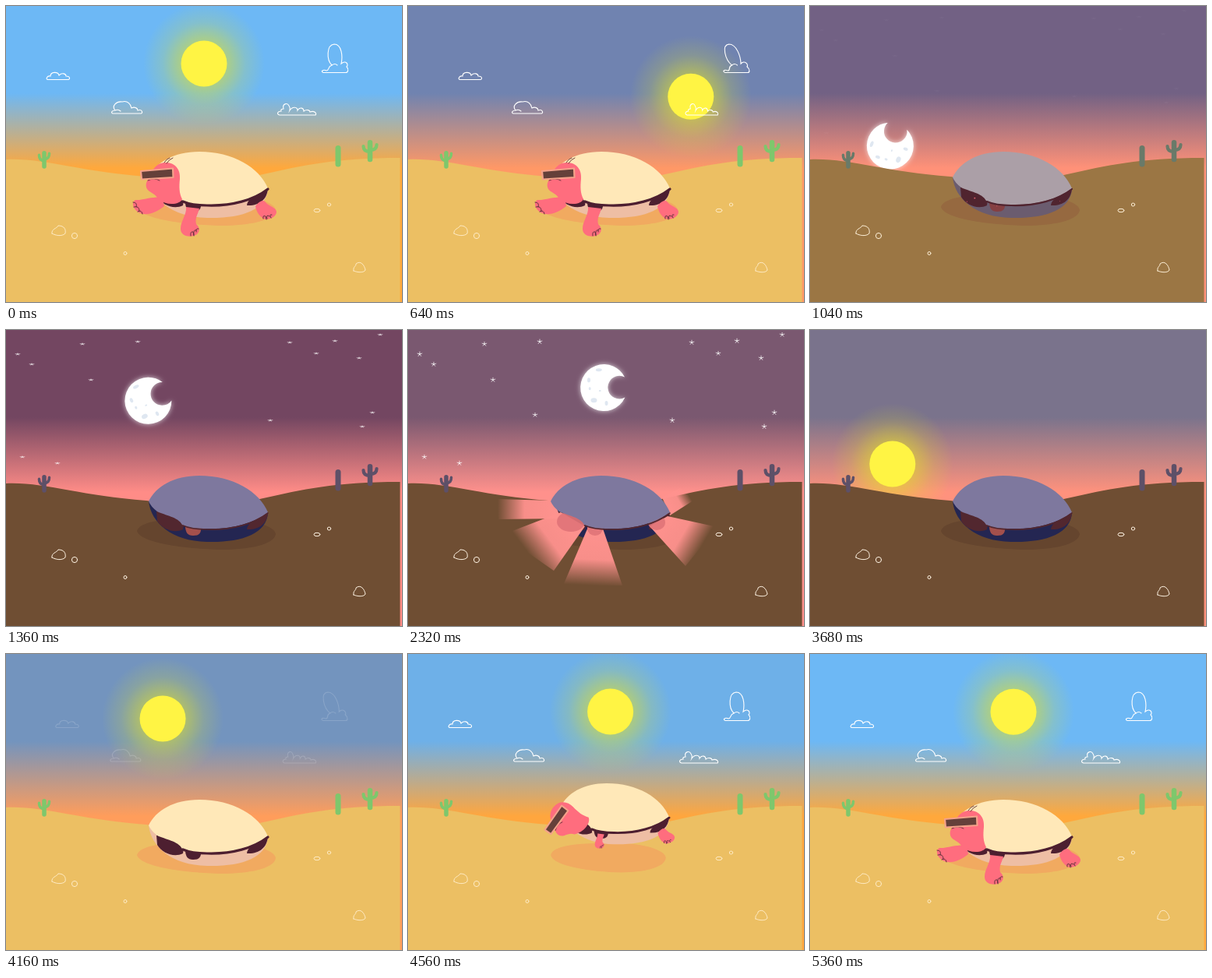
These frames come from a looping animation (508 px wide and 380 px high, 6000 ms). An HTML page with a canvas:

```html
<!DOCTYPE html>
<html lang="en">
<head>
<meta charset="utf-8">
<title>Desert turtle</title>
<style>
html, body { margin: 0; width: 100%; height: 100%; overflow: hidden; }
canvas { display: block; width: 508px; height: 380px; }
</style>
</head>
<body>
<canvas id="stage" width="508" height="380"></canvas>
<script>
const ctx = document.getElementById('stage').getContext('2d');
const LOOP = 6000, STEP = 80;

const lerp = (a, b, p) => a + (b - a) * p;
const clamp = v => Math.max(0, Math.min(1, v));
const ramp = (t, a, b) => { const p = clamp((t - a) / (b - a)); return p * p * (3 - 2 * p); };
const rgb = (c, a = 1) => `rgba(${c.map(Math.round).join()},${a})`;
const mix = (a, b, p) => a.map((v, i) => lerp(v, b[i], p));

// Smooth monotone interpolation through [time, value] keys
function spline(keys, t) {
  const i = Math.max(0, keys.findLastIndex(k => k[0] <= t));
  if (i >= keys.length - 1) return keys[keys.length - 1][1];
  const slope = n => (keys[n + 1][1] - keys[n][1]) / (keys[n + 1][0] - keys[n][0]);
  const tangent = n => {
    if (n === 0 || n === keys.length - 1) return 0;
    const a = slope(n - 1), b = slope(n);
    return 2 * a * b / (a + b);
  };
  const [t0, v0] = keys[i], [t1, v1] = keys[i + 1];
  const h = t1 - t0, p = (t - t0) / h, q = 1 - p;
  return v0 * (1 + 2 * p) * q * q + v1 * p * p * (3 - 2 * p)
    + h * p * q * (tangent(i) * q - tangent(i + 1) * p);
}

const ORBIT = [[0, 0], [640, 42.5], [1360, 153.6], [2320, 179], [2640, 182], [3680, 293], [4560, 362], [4880, 362.5]];
const SKY = [
  [0, [109, 184, 245], [255, 168, 60]],
  [640, [112, 131, 176], [255, 152, 102]],
  [1360, [115, 70, 97], [255, 140, 135]],
  [2320, [122, 88, 112], [255, 145, 140]],
  [3680, [122, 115, 140], [255, 146, 125]],
  [4560, [110, 176, 232], [255, 166, 62]],
  [4960, [109, 184, 245], [255, 168, 60]]
];

const paths = {
  ground: 'M0 197C50 195 95 213 180 219C235 227 285 227 330 216C380 205 420 195 505.5 195V380H0Z',
  shadow: 'M168 258C172 244 214 241 258 242C306 240 345 250 346 262C344 276 310 282 277 282C228 281 172 273 168 258Z',
  belly: 'M183 220C186 247 212 271 258 272C302 273 334 262 336 235Z',
  dome: 'M183 220C192 201 215 187 248 187C291 187 325 207 336 234C318 248 290 256 258 255C243 255 231 254 226 250C221 240 204 238 194 233Q186 227 183 220Z',
  rim: 'M336 235C318 249 290 257 258 256Q238 256 227 251',
  neckHole: 'M193 233C205 232 216 236 222 241Q229 247 227 256C215 262 200 255 194 245Z',
  legHole: 'M230 251H250C251 261 248 264 240 264C233 264 230 260 230 251Z',
  rearHole: 'M336 234C335 249 324 257 309 256C309 249 318 244 336 234Z',
  head: 'M205 201C218 201 224 211 223 222C222 232 222 240 226 248C222 256 205 256 195 248C193 243 189 241 184 238C177 233 179 224 186 219C187 208 195 201 205 201Z',
  glasses: 'M173 212L214 208.500L214.500 220L174 222.500Z',
  mouth: 'M182 224Q190 220 197 224',
  frontLeg: 'M201 247C188 243 176 250 166 249C160 252 163 262 172 266C182 270 194 264 203 257Z',
  frontClaws: 'M163 252Q169 252 167 258M164 258Q171 256 171 263M169 264Q174 261 175 267',
  midLeg: 'M231 258C232 268 224 276 224 286C224 295 234 297 241 295C250 292 249 284 244 280C242 272 246 268 248 260Z',
  midClaws: 'M237 295Q236 289 240 290L241 295M241 294Q240 286 244 288M244 290Q243 285 247 286',
  rearLeg: 'M320 257C325 250 331 248 333 252C338 258 346 258 347 264C347 270 340 274 333 274C326 272 321 264 320 257Z',
  rearClaws: 'M330 273Q329 268 333 270L334 274M335 273Q333 267 338 270M340 272Q337 267 341 268',
  rocks: 'M59 292C58 286 65 286 67 282C75 282 77 287 76 292C72 296 64 295 59 292ZM446 340C445 334 449 335 449 331C455 326 460 333 461 339C459 343 450 342 446 340Z'
};
for (const name in paths) paths[name] = new Path2D(paths[name]);

// Path, pivot, drift and lean for each cloud
const clouds = [
  ['M54 94.500C50 94 53 89 57 90C57 84 67 84 68 89C72 85 77 87 77 90C83 90 82 94.500 80 94.500Z', 82, 95, 13, 0, 0],
  ['M137 138C134 137 136 134 140 134C135 128 142 122 149 123C156 121 160 126 161 131C165 129 169 131 169 134C175 132 176 138 173 138ZM140 134Q144 132 147 135', 155, 138, -2, 0, 0],
  ['M351 140C347 139 348 135 353 135C352 133 354 132 356 132C354 125 361 124 363 128Q365 131 364 134C368 128 374 130 374 134C377 129 382 131 382 135C386 132 390 134 390 136C396 134 399 138 397 140Z', 398, 140, 0, 0, .15],
  ['M407 85.500C403 84 407 81 411 83C415 83 412 78 418 76C411 69 411 50 421 49C431 49 432 65 430 74C436 69 440 75 437 78C440 81 439 86 435 85.500ZM418 76Q422 73 425 76', 422, 86, 0, .25, 0]
].map(([d, ...rest]) => [new Path2D(d), ...rest]);

const stars = [[15, 31], [33, 44], [98, 18], [169, 15], [109, 64], [163, 109], [339, 116], [364, 16],
  [398, 30], [422, 14], [453, 36], [480, 6], [470, 106], [457, 124], [21, 163], [66, 171]];

// Each beam: two points at the shell, then two at its far end
const beams = [
  [187, 219, 196, 242, 116, 243, 114, 217],
  [196, 234, 227, 252, 187, 309, 121, 263],
  [231, 253, 250, 255, 275, 328, 199, 328],
  [333, 239, 310, 252, 356, 303, 397, 253],
  [326, 215, 336, 238, 369, 217, 349, 203]
];

function fill(path, color) { ctx.fillStyle = color; ctx.fill(path); }
function line(path, color, width = 1) {
  ctx.strokeStyle = color;
  ctx.lineWidth = width;
  ctx.stroke(path);
}
function disc(x, y, rx, ry = rx) {
  ctx.beginPath();
  ctx.ellipse(x, y, rx, ry, 0, 0, Math.PI * 2);
}
function grouped(draw) { ctx.save(); draw(); ctx.restore(); }
function about(x, y, sx, sy = sx, angle = 0) {
  ctx.translate(x, y);
  ctx.rotate(angle);
  ctx.scale(sx, sy);
  ctx.translate(-x, -y);
}
function glow(x, y, inner, outer, color, alpha) {
  const g = ctx.createRadialGradient(x, y, inner, x, y, outer);
  g.addColorStop(0, rgb(color, alpha));
  g.addColorStop(.5, rgb(color, alpha * .35));
  g.addColorStop(1, rgb(color, 0));
  ctx.fillStyle = g;
  disc(x, y, outer);
  ctx.fill();
}

function drawSky(t) {
  const i = SKY.findLastIndex(k => k[0] <= t);
  const a = SKY[i], b = SKY[Math.min(i + 1, SKY.length - 1)];
  const p = a === b ? 0 : (t - a[0]) / (b[0] - a[0]);
  const g = ctx.createLinearGradient(0, 112, 0, 208);
  g.addColorStop(0, rgb(mix(a[1], b[1], p)));
  g.addColorStop(1, rgb(mix(a[2], b[2], p)));
  ctx.fillStyle = g;
  ctx.fillRect(0, 0, 508, 380);
}

function drawStars(t) {
  ctx.strokeStyle = '#fff';
  ctx.lineWidth = .9;
  ctx.globalAlpha = .85 * ramp(t, 1000, 1300) * (1 - ramp(t, 3200, 3600));
  stars.forEach(([x, y], i) => grouped(() => {
    const open = ramp(t, 1300, 1800 + i * 25);
    ctx.translate(x, y);
    ctx.scale(1, lerp(.4, 1, open) * (1 - .12 * Math.sin((t - 2320) / 160 + i) ** 2));
    ctx.beginPath();
    for (let k = 0; k < 5; k++) {
      const a = -Math.PI / 2 + k * Math.PI * .4;
      ctx.moveTo(0, 0);
      ctx.lineTo(3 * Math.cos(a), 3 * Math.sin(a));
    }
    ctx.stroke();
  }));
  ctx.globalAlpha = 1;
}

function drawSunAndMoon(t) {
  const angle = spline(ORBIT, t) * Math.PI / 180;
  const x = 254 + 161 * Math.sin(angle), y = 235 - 161 * Math.cos(angle);
  if (y < 275) {
    glow(x, y, 28, 78, [225, 225, 40], .55);
    ctx.fillStyle = '#fff444';
    disc(x, y, 29.5);
    ctx.fill();
  }
  if (y > 195) grouped(() => {
    ctx.translate(254, 235);
    ctx.rotate(angle - Math.PI);
    ctx.translate(0, -161);
    const crescent = new Path2D();
    const horn = Math.atan2(13, 27), bite = Math.atan2(13, 7);
    crescent.arc(0, 0, 30, horn, Math.PI * 2 - horn);
    crescent.arc(20, 0, 14.8, -bite, bite, true);
    crescent.closePath();
    ctx.shadowColor = 'rgba(255,255,255,.75)';
    ctx.shadowBlur = 6;
    fill(crescent, '#fff');
    ctx.shadowBlur = 0;
    ctx.fillStyle = '#dfe7f1';
    for (const [cx, cy, rx, ry] of [[-6, -23, 4, 2], [-18, 1, 1.5, 2], [-5, 4, 1.5, 1], [-13, 16, 4, 3], [3, 20, 2, 3], [-19, -10, 2, 3]]) {
      disc(cx, cy, rx, ry);
      ctx.fill();
    }
  });
}

function drawClouds(t) {
  const away = t < 2400 ? ramp(t, 0, 640) : 1 - ramp(t, 4080, 4480);
  ctx.globalAlpha = t < 2400 ? 1 - ramp(t, 680, 1040) : ramp(t, 4080, 4400);
  for (const [path, x, y, drift, lean, shrink] of clouds) grouped(() => {
    ctx.translate(x + drift * away, y);
    ctx.transform(1 - shrink * away, 0, lean * away, 1, 0, 0);
    ctx.translate(-x, -y);
    line(path, '#fff', 1.1);
  });
  ctx.globalAlpha = 1;
}

function drawCactus(x, top, bottom, width, arm) {
  ctx.lineWidth = width;
  ctx.beginPath();
  ctx.moveTo(x, top + width / 2);
  ctx.lineTo(x, bottom);
  ctx.stroke();
  if (!arm) return;
  const elbow = top + (bottom - top) * .52;
  ctx.lineWidth = width * .65;
  for (const side of [-1, 1]) {
    const y = elbow - (side > 0 ? 2 : 0);
    ctx.beginPath();
    ctx.moveTo(x, y + 2);
    ctx.quadraticCurveTo(x + side * arm, y + 2, x + side * arm, y - 5);
    ctx.stroke();
  }
}

function drawLand(day) {
  const tone = (night, light) => rgb(mix(night, light, day));
  fill(paths.ground, tone([111, 78, 51], [236, 191, 99]));
  ctx.strokeStyle = tone([93, 80, 104], [126, 199, 108]);
  ctx.lineCap = 'round';
  drawCactus(49, 186, 206, 5.5, 6.5);
  drawCactus(426, 179, 203, 7, 0);
  drawCactus(467, 172, 197, 6.5, 8.5);
  const pale = tone([255, 244, 228], [255, 235, 196]);
  line(paths.rocks, pale);
  for (const [x, y, rx, ry] of [[88, 295, 3.6, 3.6], [153, 317.500, 2, 2], [399, 262.500, 4, 2.2], [414.500, 255, 2.2, 2]]) {
    disc(x, y, rx, ry);
    ctx.stroke();
  }
}

function drawBeams(t, power) {
  if (!power) return;
  const stretch = power * (1 + .12 * Math.sin((t - 2320) / 190));
  for (const [ax, ay, bx, by, cx, cy, dx, dy] of beams) {
    const mx = (ax + bx) / 2, my = (ay + by) / 2;
    const ex = lerp(mx, (cx + dx) / 2, stretch), ey = lerp(my, (cy + dy) / 2, stretch);
    const g = ctx.createLinearGradient(mx, my, ex, ey);
    g.addColorStop(0, rgb([255, 146, 142], power));
    g.addColorStop(.55, rgb([255, 146, 142], power * .95));
    g.addColorStop(1, rgb([255, 146, 142], 0));
    ctx.fillStyle = g;
    ctx.beginPath();
    ctx.moveTo(ax, ay);
    ctx.lineTo(bx, by);
    ctx.lineTo(lerp(bx, cx, stretch), lerp(by, cy, stretch));
    ctx.lineTo(lerp(ax, dx, stretch), lerp(ay, dy, stretch));
    ctx.fill();
  }
  ctx.fillStyle = rgb([224, 116, 120], power * .9);
  for (const [x, y, rx, ry] of [[209, 246, 18, 13], [240, 255, 10, 9], [319, 247, 11, 10]]) {
    disc(x, y, rx, ry);
    ctx.fill();
  }
}

function drawLeg(limb, claws, x, y, size) {
  if (size <= 0) return;
  grouped(() => {
    about(x, y, size);
    fill(limb, '#ff6d7e');
    line(claws, '#61313c', 1);
  });
}

function drawHead(size, tilt, nod) {
  if (size <= 0) return;
  grouped(() => {
    about(212, 247, size);
    ctx.translate(-15 * tilt - nod, 14 * tilt);
    about(202, 222, 1, 1, -.87 * tilt);
    fill(paths.head, '#ff6d7e');
    line(paths.mouth, '#70323f', 1);
    ctx.lineJoin = 'round';
    fill(paths.glasses, '#65403a');
    line(paths.glasses, '#f5a28a', 2.2);
  });
}

function drawTurtle(t, day) {
  const tone = (night, light) => rgb(mix(night, light, day));
  const jump = ramp(t, 4240, 4520) * (1 - ramp(t, 4600, 4880));
  const tucked = t < 2400;
  const out = (from, to) => tucked ? 1 - ramp(t, 720, 1080) : ramp(t, from, to);
  const tilt = tucked ? ramp(t, 700, 1040) : 1 - ramp(t, 4600, 4960);
  const power = ramp(t, 1440, 1760) * (1 - ramp(t, 3200, 3520));
  const maroon = tone([82, 39, 47], [77, 31, 48]);

  grouped(() => {
    about(257, 260, 1 - .17 * jump, 1 - .07 * jump);
    fill(paths.shadow, tone([101, 69, 46], [241, 170, 96]));
  });

  grouped(() => {
    ctx.translate(29.3 * jump, -6 * jump);
    ctx.scale(1 - .09 * jump, 1 - .08 * jump);
    fill(paths.belly, tone([36, 38, 82], [238, 190, 164]));
    fill(paths.neckHole, maroon);
    fill(paths.rearHole, maroon);
    fill(paths.legHole, tone([164, 80, 76], [77, 31, 48]));
    drawBeams(t, power);
    drawLeg(paths.frontLeg, paths.frontClaws, 202, 251, out(4600, 4880));
    fill(paths.dome, tone([126, 120, 158], [255, 232, 184]));
    ctx.lineCap = 'round';
    line(paths.rim, maroon, lerp(1.6, 3.2, day));
    const limb = out(4240, 4520);
    const dangle = 1 - jump * .45;
    drawLeg(paths.midLeg, paths.midClaws, 240, 256, limb * dangle);
    drawLeg(paths.rearLeg, paths.rearClaws, 320, 250, limb * (1 - jump * .12));
    drawHead(limb, tilt, tucked ? ramp(t, 80, 640) : 0);
    if (limb > .95 && tilt < .1) {
      line(new Path2D('M203 201Q206 196 210 195M206 202Q209 197 214 195'), '#71413f', 1);
    }
  });
}

function draw(t) {
  const day = t < 2400 ? 1 - ramp(t, 920, 1120) : ramp(t, 3840, 4160);
  ctx.clearRect(0, 0, 508, 380);
  drawSky(t);
  drawStars(t);
  drawSunAndMoon(t);
  drawClouds(t);
  drawLand(day);
  drawTurtle(t, day);
}

const start = performance.now();
function tick() {
  const t = (performance.now() - start) % LOOP;
  draw(Math.min(5360, Math.floor(t / STEP) * STEP));
  requestAnimationFrame(tick);
}
tick();
</script>
</body>
</html>
```
